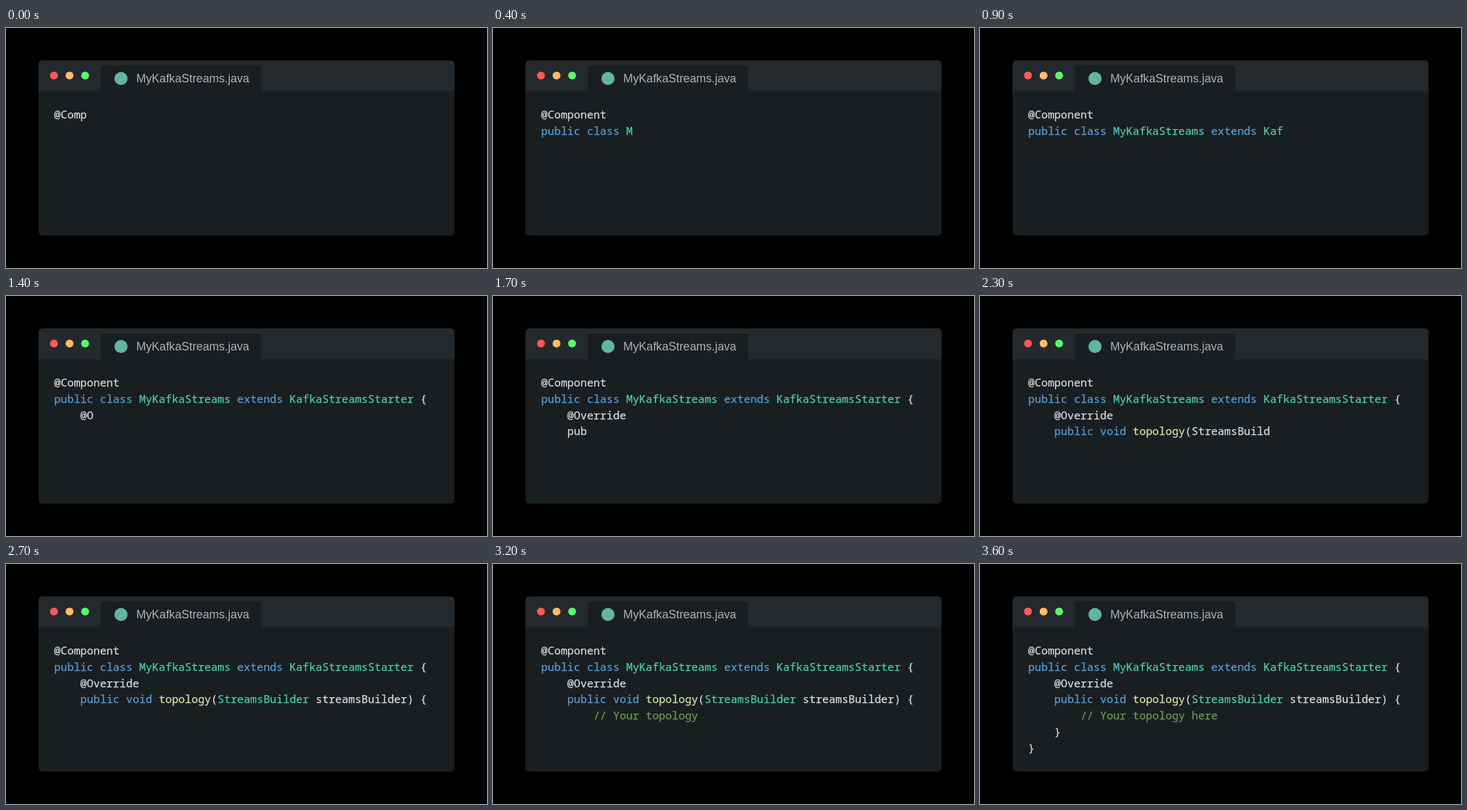
Animation of 732 by 366 pixels, one loop 4.7 s. Source, as an HTML page:

```html
<!DOCTYPE html>
<html lang="en">
<head>
<meta charset="utf-8">
<title>Code typing</title>
<style>
  html, body { margin: 0; width: 100%; height: 100%; overflow: hidden; background: #000; }
  svg { display: block; }
  .title { font: 17.7px "Liberation Sans", Arial, sans-serif; fill: #b0b2b4; }
  #code { font: 16.58px "Noto Sans Mono", monospace; color: #dadada; }
  #code text { white-space: pre; }
  #code text, tspan { fill: currentColor; stroke: currentColor; stroke-width: 0.25px; }
  .comment { color: #6a9955; }
  .keyword { color: #569cd6; }
  .type { color: #4ec9b0; }
  .method { color: #dcdcaa; }
</style>
</head>
<body>
<svg width="732" height="366" viewBox="0 0 732 366">
  <rect x="49.5" y="49.5" width="633" height="267" rx="6" fill="#191e21"/>
  <path d="M49.5 96.5V55.5a6 6 0 0 1 6-6H676.5a6 6 0 0 1 6 6V96.5z" fill="#24292d"/>
  <path d="M144 97V61a4 4 0 0 1 4-4H384.5a4 4 0 0 1 4 4V97z" fill="#191e21"/>
  <circle cx="73" cy="72.5" r="6" fill="#ff5a54"/>
  <circle cx="96.7" cy="72.5" r="6" fill="#ffbc6a"/>
  <circle cx="120.4" cy="72.5" r="6" fill="#5cf76c"/>
  <circle cx="175" cy="77" r="10" fill="#62b5a5"/>
  <text class="title" x="198.2" y="82.5">MyKafkaStreams.java</text>
  <g id="code"></g>
</svg>
<script>
const LOOP = 4700, STEP = 100, CHARS_PER_STEP = 5;
const LEFT = 73.3, BASELINE = 138, LINE_HEIGHT = 24.75;
const source = `@Component
public class MyKafkaStreams extends KafkaStreamsStarter {
    @Override
    public void topology(StreamsBuilder streamsBuilder) {
        // Your topology here
    }
}`;
const code = document.getElementById('code');

// Tokens take their colour only once they are recognisable.
const tokens = /(?<comment>\/\/.*)|(?<keyword>\b(?:public|class|extends|void)\b)|(?<type>(?<=\b(?:class|extends) )\w+|\b[A-Z]\w+(?= \w+\)))|(?<method>\w+(?=\())/g;

function highlight(line) {
  return line.replace(tokens, (word, ...rest) => {
    const groups = rest.at(-1);
    const kind = Object.keys(groups).find(name => groups[name]);
    return `<tspan class="${kind}">${word}</tspan>`;
  });
}

function typedLength(time) {
  let step = Math.floor(time / STEP);
  if (step === 28 || step === 29) step = 27; // pause before the method body
  return Math.min(source.length, (step + 1) * CHARS_PER_STEP);
}

let shown = -1;
function draw() {
  const length = typedLength(performance.now() % LOOP);
  if (length !== shown) {
    shown = length;
    code.innerHTML = source.slice(0, length).split('\n').map((line, i) =>
      `<text x="${LEFT}" y="${BASELINE + i * LINE_HEIGHT}">${highlight(line)}</text>`).join('');
  }
  requestAnimationFrame(draw);
}
draw();
</script>
</body>
</html>
```
